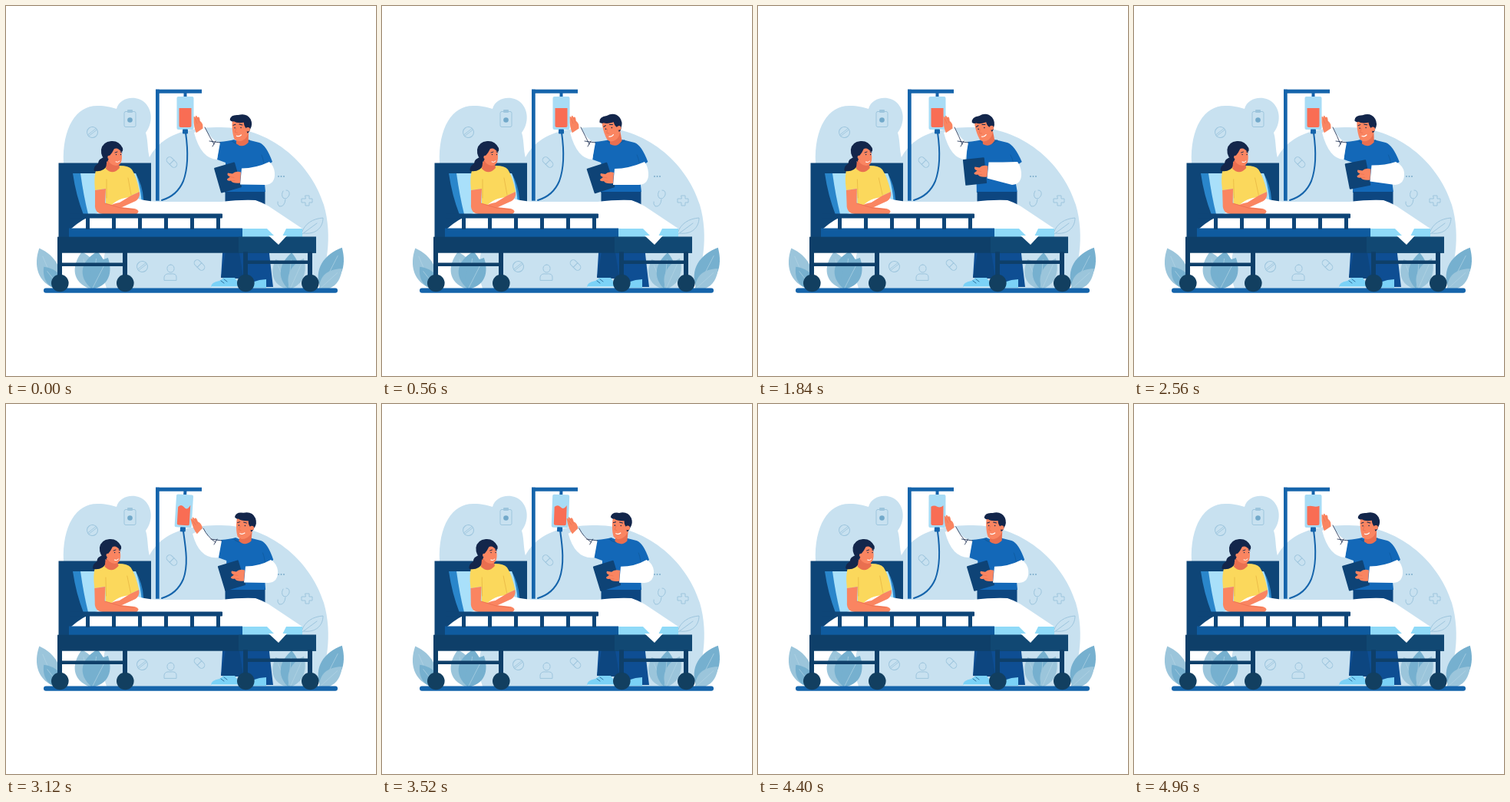
Animation of 482x482 px, one loop 5040 ms. Source, as an HTML page with a canvas:

```html
<!DOCTYPE html>
<html lang="en">
<head>
<meta charset="utf-8">
<title>Hospital bed</title>
<style>
html, body { margin: 0; width: 100%; height: 100%; overflow: hidden; background: #fff; }
canvas { display: block; width: 100vw; height: 100vh; }
</style>
</head>
<body>
<canvas id="stage" width="482" height="482"></canvas>
<script>
const ctx = document.getElementById('stage').getContext('2d');
const LOOP = 5040, STEP = 80;
const TIMES = [0, 560, 1840, 2560, 3120, 3920, 4960];
const C = {
  sky: '#c8e1f0', icon: '#9dc5dd', blue: '#1368b8', steel: '#1564ab', mid: '#0f5b9f',
  navy: '#0e4577', frame: '#0e3f69', frameLight: '#114873', wheel: '#123f60',
  pants: '#0e4e93', pantsDark: '#0d4680', ink: '#13264b', skin: '#fa8561', shade: '#e96f50',
  yellow: '#fbd85c', pale: '#a9e0fa', aqua: '#8fdaf8', leaf: '#76b0cf', leafLight: '#9bc5db',
  red: '#f96d54', white: '#fff'
};

// Periodic monotone cubic through the key poses.
function track(values) {
  const n = TIMES.length;
  const time = i => TIMES[(i + n) % n] + LOOP * Math.floor(i / n);
  const value = i => values[(i + n) % n];
  const slope = i => (value(i + 1) - value(i)) / (time(i + 1) - time(i));
  const tangent = i => {
    const a = slope(i - 1), b = slope(i);
    return a * b <= 0 ? 0 : 2 * a * b / (a + b);
  };
  return t => {
    let i = n - 1;
    while (TIMES[i] > t) i--;
    const d = time(i + 1) - time(i), u = (t - time(i)) / d, u2 = u * u, u3 = u2 * u;
    return value(i) * (2 * u3 - 3 * u2 + 1) + value(i + 1) * (3 * u2 - 2 * u3) +
      d * (tangent(i) * (u3 - 2 * u2 + u) + tangent(i + 1) * (u3 - u2));
  };
}

const pose = {
  headX: track([306, 299, 294.5, 302, 311.5, 311, 306]),
  tilt: track([-2, -13, -14, -5, 3, 2, -2]),
  lean: track([0, -1, -5, -2, 2, 1, 0]),
  handX: track([250, 250, 247, 250, 248, 247.5, 250]),
  handY: track([153, 153, 153, 153, 157, 156.5, 153]),
  handTilt: track([-4, -4, -4, -4, -18, -12, -4]),
  boardX: track([289, 285, 282.5, 291.5, 294, 291.5, 289]),
  boardY: track([223.5, 224, 215.5, 219.5, 223.5, 224, 223.5]),
  boardTilt: track([-16, -18, -6, -11, -17, -17, -16]),
  elbow: track([0, -3, -7, 2, 4, 4, 0]),
  patient: track([0, 0, -3, -2.5, -2, -1, 0]),
  swing: track([0, 0, 0, 0, 3.5, 0.6, 0]),
  slosh: track([0, 0, 0, 0, 1.6, 1, 0.3])
};

function fill(path, color) {
  ctx.fillStyle = color;
  ctx.fill(new Path2D(path));
}
function line(path, color, width = 1) {
  ctx.strokeStyle = color;
  ctx.lineWidth = width;
  ctx.lineCap = ctx.lineJoin = 'round';
  ctx.stroke(new Path2D(path));
}
function rect(x, y, w, h, color) {
  ctx.fillStyle = color;
  ctx.fillRect(x, y, w, h);
}
function round(x, y, w, h, r, color, outline) {
  ctx.beginPath();
  ctx.roundRect(x, y, w, h, r);
  if (color) { ctx.fillStyle = color; ctx.fill(); }
  if (outline) { ctx.strokeStyle = outline; ctx.lineWidth = 1; ctx.stroke(); }
}
function disc(x, y, r, color) {
  round(x - r, y - r, 2 * r, 2 * r, r, color);
}
function at(x, y, degrees, draw) {
  ctx.save();
  ctx.translate(x, y);
  ctx.rotate(degrees * Math.PI / 180);
  draw();
  ctx.restore();
}
// Shears upward from a fixed base line, moving the top by dx.
function sway(dx, base, height, draw) {
  ctx.save();
  ctx.transform(1, 0, -dx / height, 1, dx * base / height, 0);
  draw();
  ctx.restore();
}

function tablet(x, y) {
  at(x, y, -38, () => {
    round(-7, -7, 14, 14, 7, null, C.icon);
    line('M-7-1H7M-7 1H7', C.icon, 0.8);
  });
}
function capsule(x, y) {
  at(x, y, 45, () => {
    round(-8, -4, 16, 8, 4, null, C.icon);
    line('M0-4V4', C.icon);
  });
}
function leaf(x, y, length, width, angle, color) {
  at(x, y, angle, () => {
    fill(`M0 0C${-width} ${-length * .3} ${-width * .8} ${-length * .7} 0 ${-length}` +
      `C${width * .8} ${-length * .7} ${width} ${-length * .3} 0 0`, color);
    line(`M0 0V${-length * .8}`, '#b5d5e6', 0.6);
  });
}

function background() {
  fill('M75 205C73 158 92 129 120 130C130 130 137 132 144 134C148 118 171 115 182 127C192 138 190 155 182 165C186 178 183 190 190 207V300H76Z', C.sky);
  fill('M176 252C176 180 212 158 280 158C342 158 396 202 414 259C426 300 418 346 403 370H132C124 350 126 330 130 318Z', C.sky);
  tablet(112.5, 164.5);
  tablet(177.5, 339.5);
  capsule(216, 203.5);
  capsule(252, 337.5);
  round(154, 137.5, 15, 20, 2, null, C.icon);
  round(158, 135, 7, 4, 1, C.icon);
  disc(161.5, 148.5, 3.3, '#72a9ca');
  for (const x of [355, 358.5, 362]) disc(x, 222, 0.9, '#76a8c8');
  line('M365 240Q370 240 369 246Q366 253 361 250Q358 246 361 241M364 252Q363 262 356 261Q353 258 354 255', C.icon);
  line('M390 247H395V251H399V256H395V260H390V256H385V251H390Z', C.icon);
  round(210, 337, 9, 10, 4.5, null, C.icon);
  line('M206 357V353Q207 348 214 349Q222 348 222 353V357Z', C.icon);
  line('M385 296C389 283 400 277 413 276C413 289 403 298 388 296M386 297L405 283', C.icon);
}

function plants() {
  leaf(66, 369, 58, 20, -23, C.leafLight);
  leaf(72, 369, 37, 14, -38, C.leaf);
  leaf(110, 369, 50, 22, -13, C.leafLight);
  leaf(112, 369, 50, 23, 8, C.leaf);
  leaf(112, 369, 46, 18, 27, C.leaf);
  leaf(410, 369, 61, 21, 27, C.leaf);
  leaf(408, 369, 40, 14, 48, C.leafLight);
  leaf(367, 369, 42, 17, -22, C.leafLight);
  leaf(368, 369, 48, 18, 5, C.leaf);
  leaf(370, 369, 44, 14, 24, C.leafLight);
  round(49, 367.5, 383, 6.2, 3, C.steel);
}

function stand(t) {
  rect(195, 108.7, 4.7, 145, C.steel);
  rect(195, 108.7, 60, 5, C.steel);
  const swing = pose.swing(t), end = 234 - swing * 0.9, wave = pose.slosh(t);
  line(`M${end} 165C${end + 3} 186 238 209 231 228Q223 247 203 253`, C.steel, 2);
  at(233.5, 112, swing, () => {
    rect(-2, 0, 4, 7, C.steel);
    round(-11, 6, 22, 43, 2, '#a8dcf5');
    fill(`M-8 ${21 + wave}Q-4 ${21 - 2 * wave} 0 ${21 + wave}T8 ${21 - wave}V44Q8 46 6 46H-6Q-8 46-8 44Z`, C.red);
    round(-3.5, 48.5, 7, 6, 1, C.steel);
  });
}

function doctorHead(t) {
  at(pose.headX(t), 157, pose.tilt(t), () => {
    fill('M-5 8L-7 22Q1 29 9 21L10 2Z', C.shade);
    fill('M-11-8C-12 2-11 11-9 16Q-5 21 2 18Q8 15 10 7L10-8Z', C.skin);
    fill('M-14-9Q-13-16-3-15Q8-18 13-9Q16-2 12 4Q11 8 8 9L7 3Q4 0 4-5Q-5-4-9-7Q-12-6-14-9Z', C.ink);
    disc(9, 4, 2.8, C.skin);
    line('M-10-2L-7-3M-2-3L2-2', C.ink);
    disc(-8, 1.5, 0.8, C.ink);
    disc(0, 1.5, 0.8, C.ink);
    line('M-6 2L-8 7L-5 8', C.shade, 0.8);
    line('M-6 12Q-3 13.5 0 11', C.white, 1.2);
  });
}

function doctor(t) {
  const lean = pose.lean(t), hx = pose.handX(t), hy = pose.handY(t);
  fill('M286 258H337Q340 300 348 366H304L303 355L280 354Z', C.pants);
  fill('M286 321H304L311 366H304L303 355L280 354Z', C.pantsDark);
  fill('M284 354H298L306 366H267Q267 360 278 358Z', '#7bd2f7');
  line('M268 366H305', '#e8f7ff', 1.2);
  line('M280 358L284 361M284 356L288 359', C.navy, 0.7);
  fill('M312 367Q320 357 339 356V367Z', '#7bd2f7');

  sway(lean, 245, 65, () => {
    fill('M278 177Q290 176 297 174Q306 179 314 174L330 178Q339 181 347 203L335 211L338 242L285 243Q287 223 286 204L275 200Z', C.blue);
    line('M295 176Q304 184 317 175', C.mid, 1.2);
    line('M333 194Q337 203 337 220', C.mid, 0.8);
  });
  rect(285.5, 242, 52, 17, C.pantsDark);

  const sx = 279 + lean;
  fill(`M${hx - 5} ${hy + 12}L${hx + 9} ${hy + 5}Q${hx + 17} ${hy + 22} ${sx} 178L${sx - 4} 200Q${hx + 4} ${hy + 46} ${hx - 5} ${hy + 12}Z`, C.white);
  line(`M${hx + 9} ${hy + 5}Q${hx + 15} ${hy + 17} ${sx - 8} 180M${sx - 14} 176L${sx} 178M${sx - 6} 176L${sx - 10} 183`, C.ink, 0.8);
  at(hx, hy, pose.handTilt(t), () => {
    fill('M-5-6Q-5-12-3-8Q-2-13 0-8Q3-10 3-3Q7 0 6 7L-3 12Q-6 4-5-6Z', C.skin);
    line('M-3-6L-1 0M0-7L2-1', C.shade, 0.6);
  });
  doctorHead(t);

  const bx = pose.boardX(t), by = pose.boardY(t), e = pose.elbow(t);
  at(bx, by, pose.boardTilt(t), () => round(-14, -17, 28, 34, 1, '#0e4376'));
  const cx = bx + 18, cy = by;
  fill(`M${cx} ${cy - 12}Q${cx + 18} ${cy - 12} ${343 + lean} 203Q${349 + e} 208 ${350 + e} 217Q${351 + e} 232 ${338 + e} 233L${cx - 2} ${cy + 9}Z`, C.white);
  at(cx, cy, 0, () => {
    fill('M-1-7Q-8-9-12-5L-18-6Q-20-3-15-1L-19 2Q-19 5-14 4Q-12 8-2 7Z', C.skin);
    line('M-15-1L-10 0M-14 4L-9 4', C.shade, 0.6);
  });
}

function patientHead() {
  fill('M130 196Q120 199 120 205Q113 210 115 215Q127 217 132 207Z', C.ink);
  fill('M132 198L130 212Q139 221 148 211L146 200Z', C.shade);
  fill('M131 184Q145 179 150 186L151 196Q151 208 143 208Q134 207 131 196Z', C.skin);
  fill('M132 203Q123 197 124 187Q126 177 137 176Q147 175 152 185Q153 190 150 190Q146 184 141 186Q138 192 135 195Q134 199 132 203Z', C.ink);
  disc(134.5, 197, 2.2, C.skin);
  line('M142 191L145 190M149 190L151 191', C.ink, 0.9);
  disc(143.5, 193.5, 0.7, C.ink);
  disc(149.5, 193.5, 0.7, C.ink);
  line('M143 203Q146 204.5 148 202', C.white);
}

function patient(t) {
  sway(pose.patient(t), 268, 78, () => {
    fill('M118 211Q126 208 131 209Q140 216 148 208Q160 208 164 213Q170 222 174 242L163 247L165 263H130V238L116 240Q114 222 118 211Z', C.yellow);
    line('M131 226V250M159 224L163 246', '#e8b744', 0.8);
    patientHead();
  });
}

function patientArms(t) {
  sway(pose.patient(t), 268, 78, () => {
    fill('M163 247L174 242Q175 250 169 254L149 263Q141 266 134 261Q140 257 148 256Z', C.skin);
    fill('M116 240L130 238L129 257L149 262L168 264Q176 267 170 271H126Q115 270 116 258Z', C.skin);
    line('M129 257L149 263L166 265', C.shade, 0.8);
  });
}

function bed(t) {
  rect(68.5, 204.5, 120.5, 98, C.navy);
  fill('M87 218H169Q178 234 179 251L181 272H101Q91 246 87 218Z', '#2a86cb');
  fill('M97 218H169Q176 235 178 271H107Q101 247 97 218Z', C.pale);
  patient(t);
  fill('M85 290Q98 278 118 270L134 263Q146 248 167 249Q180 255 207 255H281Q306 252 325 253Q339 258 347 264L386 290L378 295L363 295L355 311L346 300H85Z', C.white);
  fill('M307 290H340L352 302H307ZM365 290H386V302H359Z', C.aqua);
  patientArms(t);
  rect(82, 289.5, 226, 12, C.mid);
  for (let x = 104; x < 280; x += 34) rect(x, 275, 5, 16, C.navy);
  round(82, 270.5, 200, 6, 1, C.navy);
  rect(67, 300.7, 337, 21, C.frame);
  rect(303, 300.7, 101, 21, C.frameLight);
  fill('M342 299H366L355 311Z', C.white);
  rect(73, 334.5, 80, 4.5, C.frame);
  rect(314, 331.5, 80, 4.5, C.frame);
  for (const x of [70, 155, 312, 396]) {
    rect(x - 3, 320, 6, 38, C.frame);
    disc(x + 0.3, 361, 11.3, C.wheel);
  }
}

function draw(now) {
  const t = Math.floor((now % LOOP) / STEP) * STEP;
  ctx.fillStyle = C.white;
  ctx.fillRect(0, 0, 482, 482);
  background();
  plants();
  stand(t);
  doctor(t);
  bed(t);
}

function tick() {
  draw(performance.now());
  requestAnimationFrame(tick);
}
tick();
</script>
</body>
</html>
```
